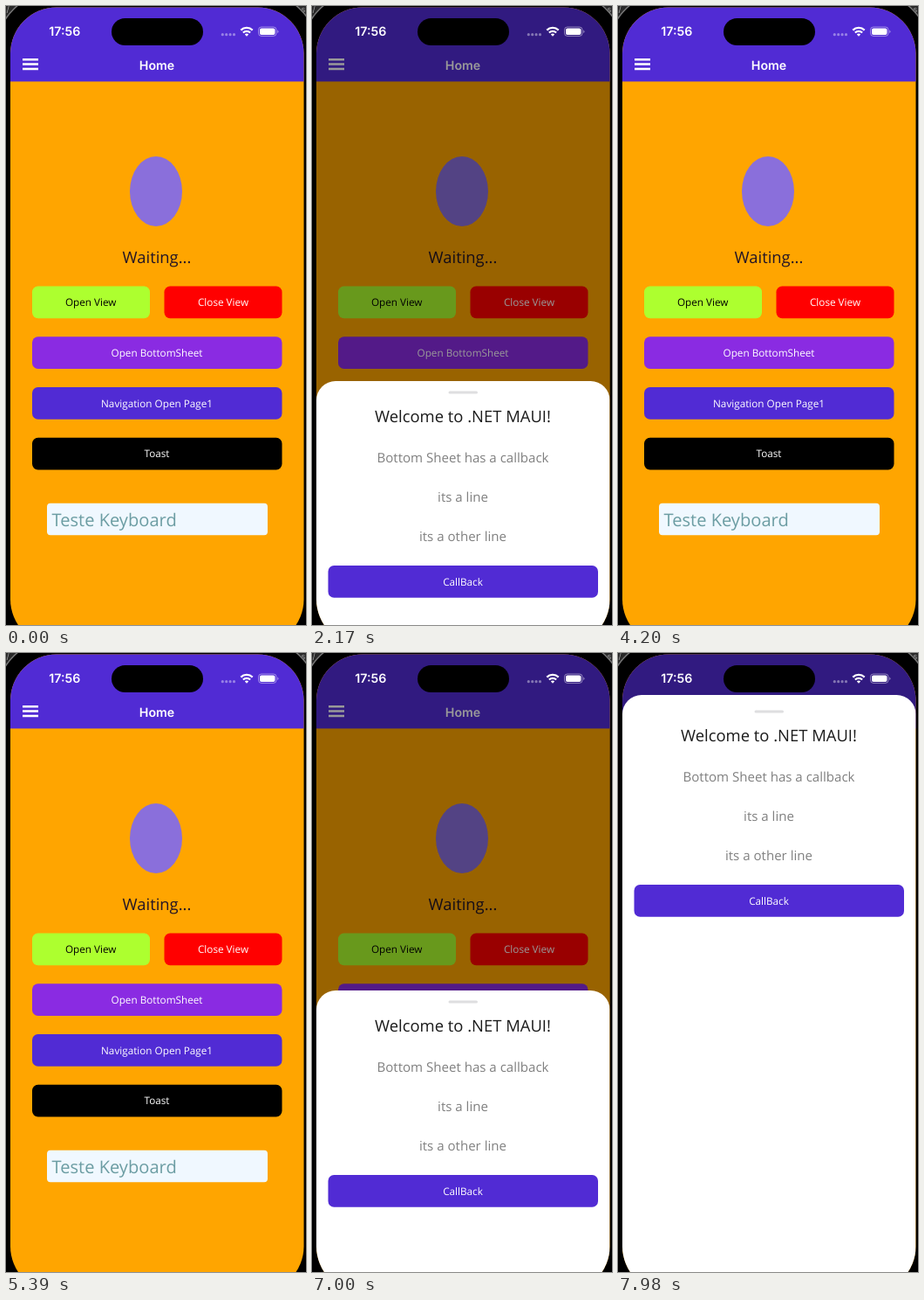
Recreate the animation shown at these times as an HTML page. Size 344 by 708 pixels, loop 8 s.

```html
<!DOCTYPE html>
<html lang="en">
<head>
<meta charset="utf-8">
<title>Bottom sheet</title>
<style>
  html, body { margin: 0; width: 100%; height: 100%; overflow: hidden; background: #000; }
  svg { display: block; width: 344px; height: 708px; }
  text {
    font: 11.72px "Open Sans", sans-serif; text-anchor: middle; fill: #fff;
    text-rendering: geometricPrecision;
  }
  .bar { font: 600 14.2px Inter, sans-serif; }
  .title { font-size: 18.42px; fill: #1b1b1b; }
  .status { fill: #231526; }
  .line { font-size: 15.07px; fill: #808080; }
  .entry { font-size: 20.1px; fill: #6c9da3; text-anchor: start; }
  .edge { font: 9px Inter, sans-serif; fill: #aaa; }
  .dark { fill: #000; }
  .brand { fill: #512bd4; }
</style>
</head>
<body>
<svg viewBox="0 0 344 708">
  <defs>
    <clipPath id="screen"><rect x="5" y="1.5" width="336.5" height="730" rx="53"/></clipPath>
  </defs>

  <rect width="344" height="708" fill="#292929"/>
  <text class="edge" x="2" y="7">/</text>
  <text class="edge" x="341" y="7">s</text>
  <rect x="-10" y="-14" width="366" height="780" rx="62" stroke="#777" stroke-width="1.5"/>

  <g clip-path="url(#screen)">
    <rect width="344" height="732" fill="#ffa500"/>
    <rect class="brand" width="344" height="86.4"/>
    <path d="M19 61.3h18M19 66.6h18M19 71.9h18" stroke="#fff" stroke-width="2.5"/>
    <text class="bar" x="173" y="73">Home</text>

    <ellipse cx="172" cy="212" rx="30" ry="40" fill="#8a6fdb"/>
    <text class="title status" x="173" y="294">Waiting...</text>

    <rect x="30" y="320.5" width="135" height="36.7" rx="6.7" fill="#adff2f"/>
    <text class="dark" x="97.2" y="343.2">Open View</text>
    <rect x="181.5" y="320.5" width="135" height="36.7" rx="6.7" fill="#f00"/>
    <text x="249" y="343.2">Close View</text>
    <rect x="30" y="378.2" width="286.5" height="36.7" rx="6.7" fill="#8a2be2"/>
    <text x="173" y="401">Open BottomSheet</text>
    <rect class="brand" x="30" y="436" width="286.5" height="36.7" rx="6.7"/>
    <text x="173" y="458.7">Navigation Open Page1</text>
    <rect class="dark" x="30" y="493.7" width="286.5" height="36.7" rx="6.7"/>
    <text x="173" y="516.4">Toast</text>

    <rect x="47" y="568.7" width="253" height="36.5" rx="4" fill="#f0f8ff"/>
    <text class="entry" x="52.5" y="594.5">Teste Keyboard</text>

    <rect id="dim" width="344" height="732" opacity="0"/>

    <rect id="sheet" x="5" y="732" width="336.5" height="800" rx="22" fill="#fff"/>
    <g id="content" transform="translate(0 732)">
      <rect x="156.5" y="11.5" width="33.5" height="3" rx="1.5" fill="#dedee0"/>
      <text class="title" x="173" y="46.5">Welcome to .NET MAUI!</text>
      <text class="line" x="173" y="92.5">Bottom Sheet has a callback</text>
      <text class="line" x="173" y="137.5">its a line</text>
      <text class="line" x="173" y="182.5">its a other line</text>
      <rect class="brand" x="18.5" y="211" width="309.5" height="36.7" rx="6.7"/>
      <text x="173" y="233.8">CallBack</text>
    </g>

    <rect class="dark" x="121" y="14" width="105" height="31" rx="15.5"/>
    <text class="bar" x="67.3" y="34.3">17:56</text>
    <path d="M248.3 32.7h14" stroke="#fff" stroke-opacity=".4" stroke-width="3.2"
          stroke-linecap="round" stroke-dasharray="0 4.4"/>
    <g fill="none" stroke="#fff" stroke-width="2.2">
      <path d="M269.3 27.6a9.6 9.6 0 0 1 13.4 0M271.9 30.5a5.8 5.8 0 0 1 8.2 0"/>
      <path d="M276 34.8l-2.2-2.3a3.1 3.1 0 0 1 4.4 0z" fill="#fff" stroke="none"/>
    </g>
    <rect x="289.5" y="24" width="20.5" height="10.4" rx="3.3" fill="none" stroke="#fff" stroke-opacity=".45"/>
    <rect x="291" y="25.5" width="17.5" height="7.4" rx="2" fill="#fff"/>
    <path d="M311.3 27.4a2 2 0 0 1 0 3.6z" fill="#fff" fill-opacity=".5"/>
  </g>
</svg>
<script>
  const LOOP = 8000, STEP = 70, CLOSED = 732, HALF = 429, SAFE_TOP = 54;
  const [sheet, content, dim] = ['sheet', 'content', 'dim'].map(id => document.getElementById(id));

  // Finger drags: [ms, top of sheet]
  const drag = [[6930, HALF], [7000, 386], [7140, 297], [7280, 224], [7350, 233],
                [7630, 233], [7700, 205], [7770, 151], [7840, 98], [7910, 62], [7980, 48]];

  const clamp = v => Math.min(1, Math.max(0, v));

  // Critically damped spring, 0 to 1
  function spring(ms) {
    const x = Math.max(0, ms) * 0.0171;
    return 1 - Math.exp(-x) * (1 + x);
  }

  // Sum of open, close and open again
  const toggles = (t, f) => f(t - 676) - f(t - 3600) + f(t - 5436);

  function dragTop(t) {
    const i = drag.findIndex(p => p[0] >= t);
    if (i < 0) return drag[drag.length - 1][1];
    const [t0, y0] = drag[i - 1] || drag[0], [t1, y1] = drag[i];
    return t1 === t0 ? y1 : y0 + (y1 - y0) * (t - t0) / (t1 - t0);
  }

  function render(t) {
    const top = t >= drag[0][0] ? dragTop(t) : CLOSED - (CLOSED - HALF) * toggles(t, spring);
    sheet.setAttribute('y', top.toFixed(1));
    // The content stays below the status bar when the sheet overshoots
    content.setAttribute('transform', `translate(0 ${Math.max(top, SAFE_TOP).toFixed(1)})`);
    dim.setAttribute('opacity', (0.4 * toggles(t, ms => clamp(ms / 400))).toFixed(3));
  }

  let start;
  function tick(now) {
    start ??= now;
    const t = (now - start) % LOOP;
    render(Math.floor(t / STEP) * STEP);
    requestAnimationFrame(tick);
  }
  requestAnimationFrame(tick);
</script>
</body>
</html>
```
